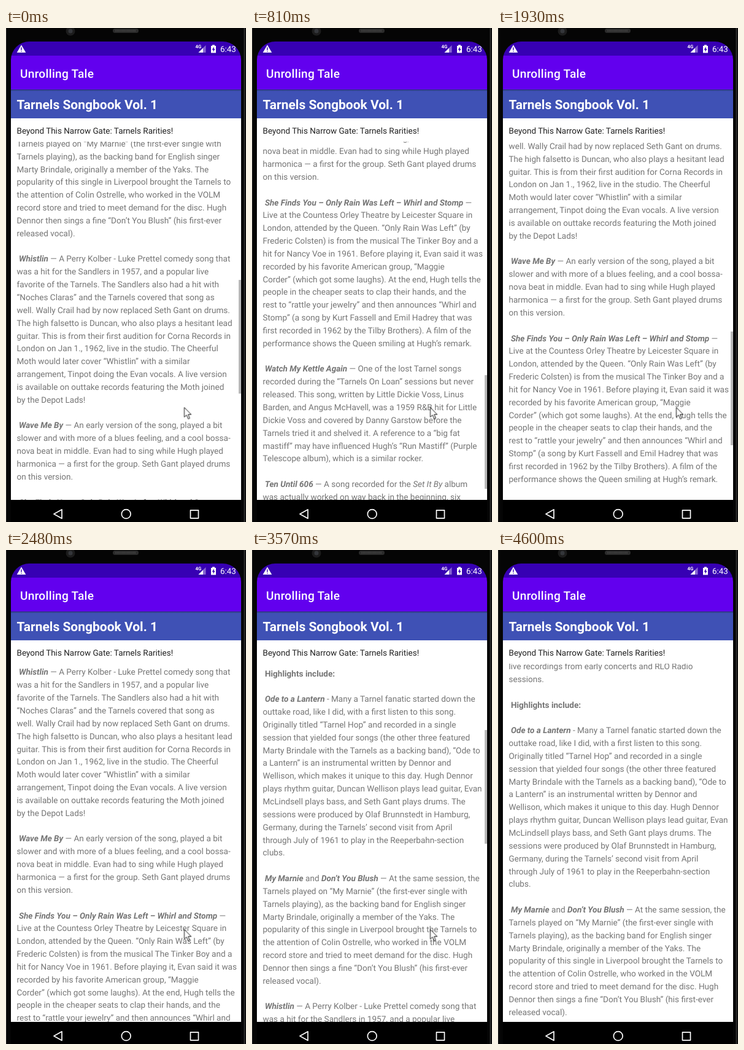
These frames come from a looping animation (391 by 804 pixels, 5.13 s). An HTML page:

```html
<!DOCTYPE html>
<html lang="en">
<head>
<meta charset="utf-8">
<title>Unrolling Tale</title>
<style>
  html, body { margin: 0; width: 100%; height: 100%; overflow: hidden; background: #050505; }
  body { position: relative; font-family: Roboto, sans-serif; text-rendering: geometricPrecision; }
  svg { position: absolute; left: 0; top: 0; }
  #view { position: absolute; left: 8px; top: 185px; width: 375px; height: 583px; overflow: hidden; background: #fff; }
  #article { position: absolute; left: 9.5px; top: 0; margin: 0; white-space: pre;
    font: 13.57px/20.85px Roboto, sans-serif; color: #757575; }
  #article em { font-weight: 700; font-style: italic; }
  #article cite { font-style: italic; }
  #bar { position: absolute; right: 0; top: 0; width: 4px; height: 185px; background: #b9b9b9; }
</style>
</head>
<body>
<svg width="391" height="804" viewBox="0 0 391 804">
  <defs>
    <clipPath id="screen"><path d="M8 804V52A30 30 0 0 1 38 22H353A30 30 0 0 1 383 52V804Z"/></clipPath>
    <linearGradient id="shade" x2="0" y2="1">
      <stop stop-color="#000" stop-opacity=".35"/><stop offset="1" stop-color="#000" stop-opacity="0"/>
    </linearGradient>
  </defs>
  <!-- phone body -->
  <path d="M.5 0V804" stroke="#2c2c2c"/>
  <path d="M388.5 0V804" stroke="#2c2c2c" stroke-width="2"/>
  <circle cx="105" cy="5" r="7.5" fill="#1c1c1c"/>
  <circle cx="105" cy="5" r="3.5" fill="#34363a"/>
  <rect x="174" y="1" width="42" height="7" rx="3.5" fill="#2b2b2b"/>
  <path d="M178 4.5H212" stroke="#444" stroke-width="3" stroke-dasharray="1 1"/>
  <g clip-path="url(#screen)">
    <rect x="8" y="22" width="375" height="24" fill="#3700b3"/>
    <rect x="8" y="45" width="375" height="55" fill="#6200ee"/>
    <rect x="8" y="100" width="375" height="47" fill="#3f51b5"/>
    <rect x="8" y="100" width="375" height="3" fill="url(#shade)"/>
    <rect x="8" y="147" width="375" height="38" fill="#fff"/>
    <rect x="8" y="768" width="375" height="36" fill="#000"/>
    <g fill="#fff">
      <path d="M25 27.5L32.3 40H17.7Z"/>
      <path d="M25 31.5V36M25 37.2V38.6" stroke="#3700b3" stroke-width="1.4"/>
      <text x="308.5" y="33" font-size="7.8" font-weight="700">4G</text>
      <path d="M325.5 28V40H313.5Z" opacity=".4"/>
      <path d="M321 32.5V40H313.5Z"/>
      <path d="M336 27.5H340V29H342V40.5H334V29H336Z"/>
      <path d="M338.8 30.5L335.7 35.6H337.6V39L340.5 33.9H338.8Z" fill="#3700b3"/>
      <text x="349" y="39" font-size="13.4">6:43</text>
      <text x="23" y="80.5" font-size="19.1" font-weight="500" letter-spacing=".3">Unrolling Tale</text>
      <text x="17.5" y="132" font-size="21" font-weight="700">Tarnels Songbook Vol. 1</text>
    </g>
    <text x="17.5" y="172" font-size="13.5" fill="#212121">Beyond This Narrow Gate: Tarnels Rarities!</text>
    <g fill="none" stroke="#fff" stroke-width="1.7" stroke-linejoin="round">
      <path d="M78 791L91 783.7V798.3Z"/>
      <circle cx="195.7" cy="791" r="7.4"/>
      <rect x="300.5" y="784.8" width="13" height="13"/>
    </g>
  </g>
</svg>
<div id="view">
<div id="article">live recordings from early concerts and RLO Radio
sessions.

 <b>Highlights include:</b>

 <em>Ode to a Lantern</em> - Many a Tarnel fanatic started down the
outtake road, like I did, with a first listen to this song.
Originally titled “Tarnel Hop” and recorded in a single
session that yielded four songs (the other three featured
Marty Brindale with the Tarnels as a backing band), “Ode to
a Lantern” is an instrumental written by Dennor and
Wellison, which makes it unique to this day. Hugh Dennor
plays rhythm guitar, Duncan Wellison plays lead guitar, Evan
McLindsell plays bass, and Seth Gant plays drums. The
sessions were produced by Olaf Brunnstedt in Hamburg,
Germany, during the Tarnels’ second visit from April
through July of 1961 to play in the Reeperbahn-section
clubs.

 <em>My Marnie</em> and <em>Don’t You Blush</em> — At the same session, the
Tarnels played on “My Marnie” (the first-ever single with
Tarnels playing), as the backing band for English singer
Marty Brindale, originally a member of the Yaks. The
popularity of this single in Liverpool brought the Tarnels to
the attention of Colin Ostrelle, who worked in the VOLM
record store and tried to meet demand for the disc. Hugh
Dennor then sings a fine “Don’t You Blush” (his first-ever
released vocal).

 <em>Whistlin</em> — A Perry Kolber - Luke Prettel comedy song that
was a hit for the Sandlers in 1957, and a popular live
favorite of the Tarnels. The Sandlers also had a hit with
“Noches Claras” and the Tarnels covered that song as
well. Wally Crail had by now replaced Seth Gant on drums.
The high falsetto is Duncan, who also plays a hesitant lead
guitar. This is from their first audition for Corna Records in
London on Jan 1., 1962, live in the studio. The Cheerful
Moth would later cover “Whistlin” with a similar
arrangement, Tinpot doing the Evan vocals. A live version
is available on outtake records featuring the Moth joined
by the Depot Lads!

 <em>Wave Me By</em> — An early version of the song, played a bit
slower and with more of a blues feeling, and a cool bossa-
nova beat in middle. Evan had to sing while Hugh played
harmonica — a first for the group. Seth Gant played drums
on this version.

 <em>She Finds You – Only Rain Was Left – Whirl and Stomp</em> —
Live at the Countess Orley Theatre by Leicester Square in
London, attended by the Queen. “Only Rain Was Left” (by
Frederic Colsten) is from the musical The Tinker Boy and a
hit for Nancy Voe in 1961. Before playing it, Evan said it was
recorded by his favorite American group, “Maggie
Corder” (which got some laughs). At the end, Hugh tells the
people in the cheaper seats to clap their hands, and the
rest to “rattle your jewelry” and then announces “Whirl and
Stomp” (a song by Kurt Fassell and Emil Hadrey that was
first recorded in 1962 by the Tilby Brothers). A film of the
performance shows the Queen smiling at Hugh’s remark.

 <em>Watch My Kettle Again</em> — One of the lost Tarnel songs
recorded during the “Tarnels On Loan” sessions but never
released. This song, written by Little Dickie Voss, Linus
Barden, and Angus McHavell, was a 1959 R&amp;B hit for Little
Dickie Voss and covered by Danny Garstow before the
Tarnels tried it and shelved it. A reference to a “big fat
mastiff” may have influenced Hugh’s “Run Mastiff” (Purple
Telescope album), which is a similar rocker.

 <em>Ten Until 606</em> — A song recorded for the <cite>Set It By</cite> album
was actually worked on way back in the beginning, six
years earlier, and this take shows how the group first
played it live.</div>
<div id="bar"></div>
</div>
<svg width="391" height="804" viewBox="0 0 391 804">
  <path id="pointer" d="M0 0V15.8L3.7 12.4L6.4 18.8L8.9 17.7L6.3 11.5H11.2Z"
    fill="#fff" stroke="#111" stroke-width="1"/>
</svg>
<script>
const LOOP = 5130;
const VIEW_TOP = 185;
const REST_Y = 480;      // centre of the first line when scrolled to the very top
const BAR_RATIO = 0.3174;

// [time, centre of the first line]
const scroll = [
  [0, -228], [120, -265], [270, -322], [390, -397], [510, -471], [660, -597],
  [810, -716], [940, -764], [1090, -744], [1220, -680], [1370, -603], [1520, -551],
  [1800, -532], [1930, -495], [2080, -405], [2630, -366], [2760, -258], [2900, -174.5],
  [3300, -98], [3420, 32], [3570, 139], [3690, 168], [3810, 182], [3930, 188], [4080, 190]
];
const barOpacity = [[0, 1], [2480, 0], [2630, 1], [4480, .5], [4600, 0]];
const pointer = [[0, 290.5, 617.5], [3810, 298.5, 782.5], [3930, 298.5, 900]];

const shift = (x, y) => ({ transform: `translate(${x}px, ${y}px)` });

function play(id, steps, style) {
  const frames = steps.map(([time, ...values]) =>
    ({ offset: time / LOOP, easing: 'step-end', ...style(...values) }));
  frames.push({ ...frames[frames.length - 1], offset: 1 });
  document.getElementById(id).animate(frames, { duration: LOOP, iterations: Infinity });
}

play('article', scroll, y => shift(0, Math.round(y - 10.2 - VIEW_TOP)));
play('bar', scroll, y => shift(0, Math.round((REST_Y - y) * BAR_RATIO)));
play('bar', barOpacity, opacity => ({ opacity }));
play('pointer', pointer, shift);
</script>
</body>
</html>
```
